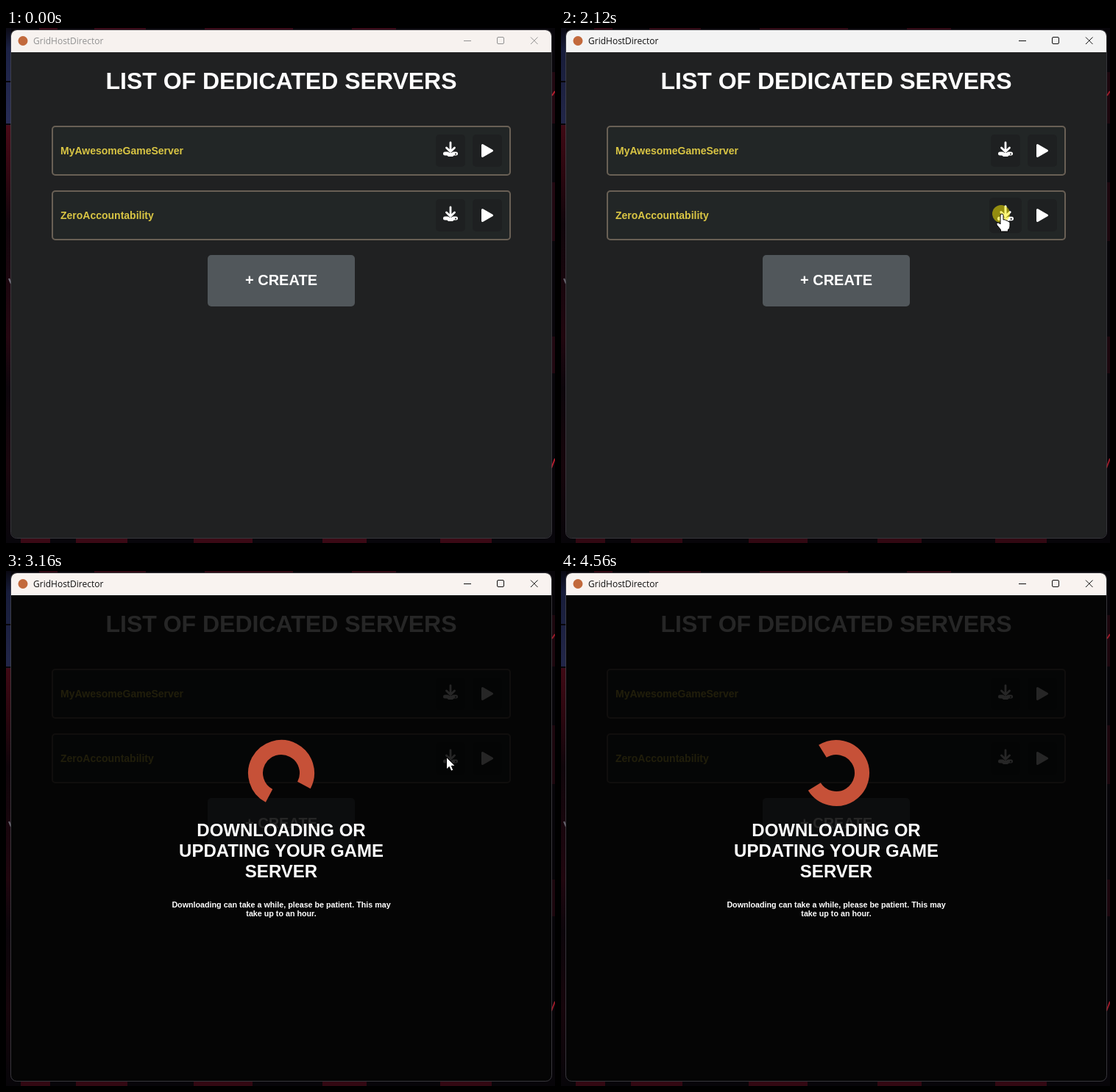
An HTML page that plays this animation: 746 by 701 pixels, repeating every 4630 ms.

```html
<!DOCTYPE html>
<html lang="en">
<head>
<meta charset="utf-8">
<title>Dedicated servers</title>
<style>
  html, body { margin: 0; width: 100%; height: 100%; overflow: hidden; background: #08060b; }
  svg { display: block; }
  text { font: bold 14px "Liberation Sans", Arial, sans-serif; }
  .mid { text-anchor: middle; fill: #fff; }
  .h1 { font-size: 32px; }
  .h2 { font-size: 24px; }
  .h6 { font-size: 10.72px; }
  .btn { font-size: 20px; }
  .caption { font: 12px "Open Sans", sans-serif; }
</style>
</head>
<body>
<svg width="746" height="701" viewBox="0 0 746 701">
  <defs>
    <linearGradient id="leftEdge" x2="0" y2="1">
      <stop offset="0" stop-color="#0b0a14"/>
      <stop offset=".04" stop-color="#1b2144"/>
      <stop offset=".185" stop-color="#272c55"/>
      <stop offset=".19" stop-color="#4a0a17"/>
      <stop offset=".29" stop-color="#300711"/>
      <stop offset=".38" stop-color="#12060c"/>
      <stop offset=".6" stop-color="#250711"/>
      <stop offset=".7" stop-color="#0d060c"/>
      <stop offset=".85" stop-color="#1a060d"/>
      <stop offset="1" stop-color="#08060b"/>
    </linearGradient>
    <clipPath id="frame"><rect x="7" y="3" width="734" height="691" rx="8"/></clipPath>
    <g id="download" fill="none" stroke="#fff" stroke-linecap="round" stroke-linejoin="round">
      <path d="M0-10V1M-5.500-3L0 2.500 5.500-3" stroke-width="2.800"/>
      <path d="M-7.500 5H-4L-2 6.500H2L4 5H7.500" stroke-width="5"/>
      <circle cx="7" cy="5.500" r="1" fill="#202122" stroke="none"/>
    </g>
    <g id="row">
      <rect x="63" y="134" width="622" height="66" rx="4" fill="#222626" stroke="#696055" stroke-width="2"/>
      <rect x="634" y="145" width="40" height="44" rx="5" fill="#1e2021"/>
      <path d="M647.500 159.500V174.500L660.500 167Z" fill="#fff" stroke="#fff" stroke-width="3" stroke-linejoin="round"/>
    </g>
    <g id="get">
      <rect x="-20" y="-22" width="40" height="44" rx="5" fill="#1e2021"/>
      <use href="#download" y="-1"/>
    </g>
  </defs>

  <rect width="746" height="701" fill="#08060b"/>
  <rect width="7" height="701" fill="url(#leftEdge)"/>
  <path d="M0 73H7M0 131H7" stroke="#08060b" stroke-width="2"/>
  <path d="M4 341L7 348" stroke="#777480" stroke-width="2"/>
  <path d="M45 1H70M120 1H190M270 1H390M470 1H530" stroke="#3a0a18" stroke-width="3"/>
  <path d="M20 698H60M95 698H165M255 698H335M430 698H490M590 698H660" stroke="#3b0915" stroke-width="6"/>
  <path d="M744 60V130M744 210V290M744 420V470" stroke="#210811" stroke-width="4"/>
  <path d="M742 92L746 86M741 599L746 586" stroke="#b51e2e" stroke-width="2"/>
  <rect id="shade" width="746" height="701" opacity=".15"/>

  <g clip-path="url(#frame)">
    <rect x="7" y="3" width="734" height="691" fill="#202122"/>
    <rect id="bar" x="7" y="3" width="734" height="30"/>
    <circle cx="23" cy="17.500" r="6.500" fill="#c2693c"/>
    <g id="controls">
      <text class="caption" x="37" y="22">GridHostDirector</text>
      <path d="M622 17.500H632M713 12.500L722.500 22M722.500 12.500L713 22" stroke="currentColor"/>
      <rect x="667.500" y="12.500" width="9" height="9" rx="1.500" fill="none" stroke="currentColor"/>
    </g>

    <text class="mid h1" x="374" y="83">LIST OF DEDICATED SERVERS</text>
    <use href="#row"/>
    <use href="#row" y="88"/>
    <g fill="#d9c544">
      <text x="74" y="172">MyAwesomeGameServer</text>
      <text x="74" y="260">ZeroAccountability</text>
    </g>
    <use href="#get" transform="translate(604 167)"/>
    <use href="#get" id="hovered"/>
    <rect x="274" y="309" width="200" height="70" rx="5" fill="#51575b"/>
    <text class="mid btn" x="374" y="350">+ CREATE</text>

    <g id="overlay">
      <rect x="7" y="33" width="734" height="661" opacity=".85"/>
      <circle id="spinner" r="35" fill="none" stroke="#c65138" stroke-width="20" pathLength="360" stroke-dasharray="270 90"/>
      <text class="mid h2" x="374" y="361">DOWNLOADING OR</text>
      <text class="mid h2" x="374" y="389">UPDATING YOUR GAME</text>
      <text class="mid h2" x="374" y="417">SERVER</text>
      <text class="mid h6" x="374" y="458">Downloading can take a while, please be patient. This may</text>
      <text class="mid h6" x="374" y="470">take up to an hour.</text>
    </g>
  </g>
  <rect x="6.500" y="2.500" width="735" height="692" rx="8" fill="none" stroke="#4b4a50" stroke-opacity=".7"/>

  <circle id="click" cx="598" cy="253" r="12" fill="#fff000" opacity=".52"/>
  <g id="cursor" fill="#fff" stroke="#000" stroke-linejoin="round">
    <path id="arrow" d="M-.500-.500V16L3.300 12.500 5.800 18.300 8.800 17 6.400 11.300H11.300Z"/>
    <path id="hand" d="M-2 1Q-2-1 0-1T2 1V7Q5 6 5.500 8 8 7.300 8.300 9.300 11 9 11 11.500V16Q11 19 8.500 20.500V23H-1.500V20.500L-6.500 14.500Q-8 12-6 11-4 10.500-2 13Z"/>
  </g>
</svg>
<script>
const LOOP = 4630, STEP = 70, CLICK = 2050, LOADING = 2180;
const $ = id => document.getElementById(id);
const show = (id, on) => $(id).setAttribute('visibility', on ? 'visible' : 'hidden');
const move = (id, value) => $(id).setAttribute('transform', value);

// time, x, y of the pointer tip
const path = [
  [480, 708, 680], [550, 698, 606], [690, 667, 478], [830, 640, 394], [970, 626, 347],
  [1040, 620, 311], [1180, 607, 270], [1250, 603, 260], [1390, 600, 254],
  [1590, 600, 254], [1600, 599, 254], [3440, 599, 254], [3510, 601, 275],
  [3650, 608, 345], [3860, 609, 489], [4070, 615, 660]
];

function pointerAt(t) {
  const i = path.findIndex(p => p[0] > t);
  if (i === 0) return path[0].slice(1);
  if (i < 0) return path[path.length - 1].slice(1);
  const a = path[i - 1], b = path[i], k = (t - a[0]) / (b[0] - a[0]);
  return [1, 2].map(n => Math.round(a[n] + (b[n] - a[n]) * k));
}

function draw(t) {
  const anchor = t < LOADING ? 1040 : LOADING;
  const step = Math.floor((t - anchor) / STEP);
  const held = anchor + step * STEP;
  const loading = t >= LOADING, active = t >= CLICK;
  const hover = held >= 1180 && t < LOADING;

  $('bar').setAttribute('fill',
    t < 70 ? '#f7f2ef' : t < 130 ? '#f5f3f1' : loading ? '#f9f3f0' : '#f3f3f3');
  $('controls').setAttribute('color', active ? '#111' : '#929292');
  $('controls').setAttribute('fill', active ? '#111' : '#929292');
  show('shade', active);

  const zoom = hover || (loading && t < LOADING + STEP) ? 1.1 : 1;
  move('hovered', `translate(604 255) scale(${zoom})`);

  show('overlay', loading);
  move('spinner', `translate(374 275) rotate(${142 + 24 * step})`);

  show('click', active && !loading);
  const visible = t >= 510 && held < 4140;
  show('arrow', visible && !hover);
  show('hand', visible && hover);
  move('cursor', `translate(${pointerAt(held)})`);
}

function tick() {
  draw(performance.now() % LOOP);
  requestAnimationFrame(tick);
}
tick();
</script>
</body>
</html>
```
